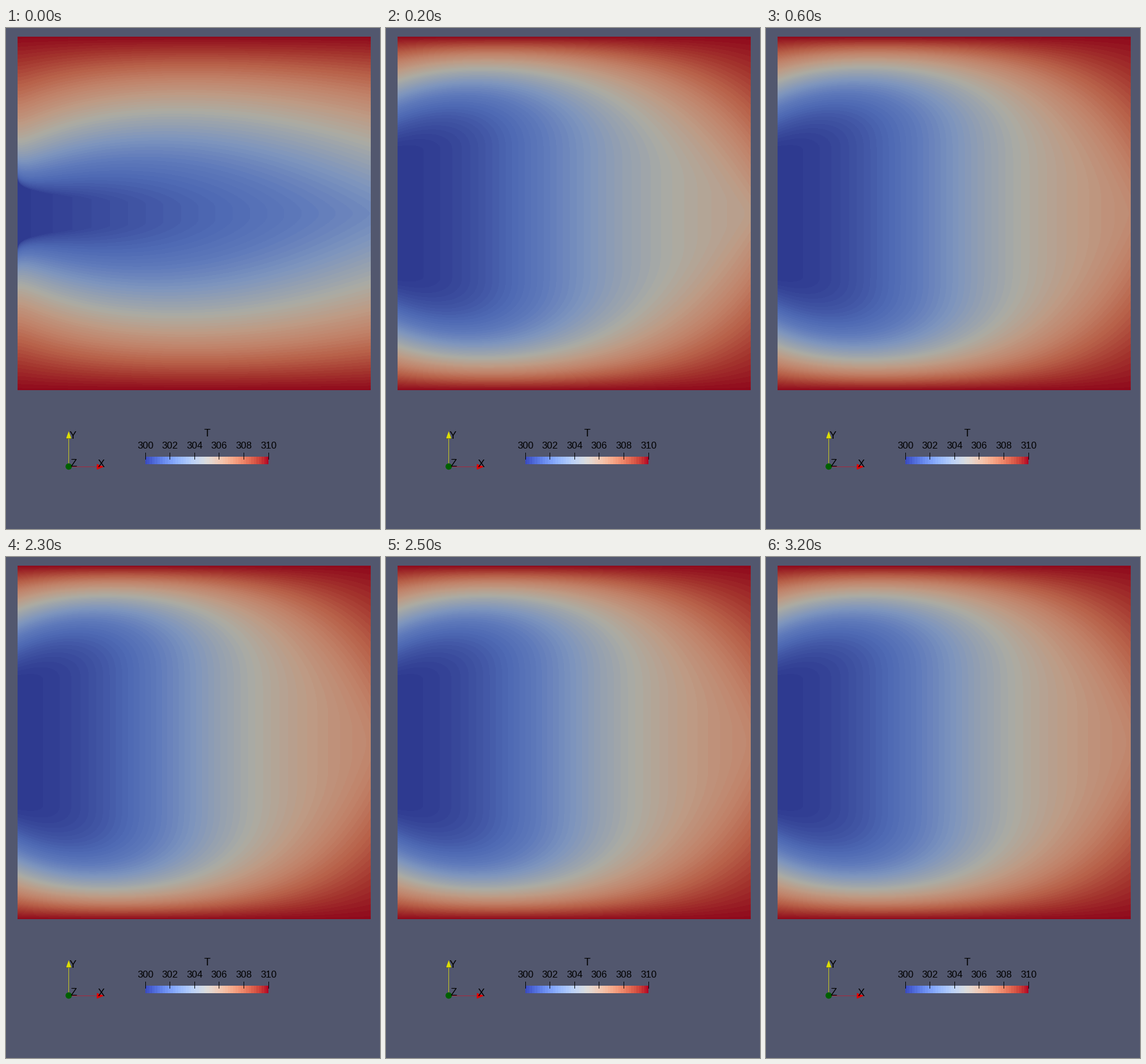
A matplotlib script that plays this animation: 647x866 px, repeating every 3300 ms.

```python
import numpy as np
import matplotlib.pyplot as plt
from matplotlib.animation import FuncAnimation
from matplotlib.colors import LinearSegmentedColormap
from matplotlib.patches import Circle, Polygon

W, H, DPI = 647, 866, 100
LEFT, TOP, SIDE = 20, 15, 611
PT = 72 / DPI
plt.rcParams["font.family"] = "Liberation Sans"

# Colour map as it looks under the scene light
SHADED = LinearSegmentedColormap.from_list("shaded", [
    (pos, tuple(c / 255 for c in rgb)) for pos, rgb in [
        (0, (46, 58, 144)), (.17, (79, 106, 180)), (.25, (95, 122, 187)),
        (.35, (126, 149, 190)), (.5, (172, 172, 163)), (.6, (190, 155, 133)),
        (.7, (193, 130, 105)), (.8, (184, 97, 73)), (.9, (164, 53, 46)),
        (1, (143, 9, 28))]], 512)

pix = (np.arange(SIDE) + .5) / SIDE
U = pix[None, :]                        # 0 at the inlet, 1 at the outlet
V = np.abs(2 * pix - 1)[:, None]        # 0 on the axis, 1 at the walls


def field(outlet, power, half, core, fade, steep_in, steep_out, bulge):
    """Temperature from 0 (inlet) to 1 (walls).

    The axis warms along a saturating curve up to `outlet`. Across the channel
    a flat core, `core` wide at the inlet, is followed by a power-law rise.
    """
    axis = outlet * (1 + half) * U ** power / (U ** power + half)
    flat = core * (1 - U ** fade)
    steep = steep_in + (steep_out - steep_in) * U + bulge * np.sin(np.pi * U)
    rise = np.clip((V - flat) / (1 - flat), 0, 1) ** steep
    return axis + (1 - axis) * rise


FIELDS = [
    field(.31, 1.15, 10, .216, .3, .55, 1.4, .55),
    field(.43, 2.0, 2, .2, 1, 1.05, 1.13, 1.15),
    field(.585, 2.2, .3, .36, 3, 1.4, 1.2, 1.6),
    field(.68, 2.2, .35, .36, 4, 1.4, 1.5, 1.8),
]


def stage(i):
    """Solver progress: quick at first, then a late step to the steady state."""
    if i < 3:
        return i
    if i < 23:
        return 2.8 - .8 * .25 ** (min(i, 6) - 2)
    return 3


def temperature(s):
    k = min(int(s), 2)
    t = FIELDS[k] + (s - k) * (FIELDS[k + 1] - FIELDS[k])
    return np.round(t * 63) / 63


fig = plt.figure(figsize=(W / DPI, H / DPI), dpi=DPI, facecolor="#52576e")
ax = fig.add_axes([0, 0, 1, 1])
ax.set_xlim(0, W)
ax.set_ylim(H, 0)
ax.axis("off")


def place(data, x, y, cmap):
    return fig.figimage(data, xo=x, yo=H - y - len(data), cmap=cmap,
                        vmin=0, vmax=1, origin="upper", zorder=-1)


def label(x, y, s, size=18):
    ax.text(x, y, s, size=size * PT, ha="center", va="baseline", zorder=6)


def line(xs, ys, color):
    ax.plot(xs, ys, color=color, lw=PT, solid_capstyle="butt", zorder=3,
            snap=False)


def shape(patch):
    patch.set(linewidth=0, zorder=4)
    ax.add_patch(patch)


plate = place(temperature(0), LEFT, TOP, SHADED)

# Colour legend
BAR_X, BAR_Y, BAR_W, BAR_H = 241, 741, 213, 13
ramp = np.round(np.linspace(0, 1, BAR_W) * 47) / 47
place(np.tile(ramp, (BAR_H, 1)), BAR_X, BAR_Y, "coolwarm")
for n in range(6):
    x = int(BAR_X + BAR_W * n / 5) + .5
    line([x, x], [734, 746], "black")
    label(x, 727, str(300 + 2 * n), 16.8)
label(348, 706, "T")

# Orientation axes
line([108.5, 108.5], [709, 757], "#c8c820")
line([108, 158], [758.5, 758.5], "#a8283c")
shape(Polygon([(108.5, 697), (104, 709.5), (113, 709.5)], color="#dede00"))
line([103.5, 113.5], [709.5, 709.5], "#2c2c20")
shape(Polygon([(169.5, 758.5), (157, 753.5), (157, 763.5)], color="#e00404"))
shape(Circle((108.5, 758), 5.5, color="#006000"))
label(165, 759, "X")
label(116, 710, "Y")
label(117, 758, "Z")


def draw(i):
    plate.set_data(temperature(stage(i)))
    return [plate]


anim = FuncAnimation(fig, draw, frames=33, interval=100, repeat=True,
                     repeat_delay=0, blit=False)
plt.show()
```
